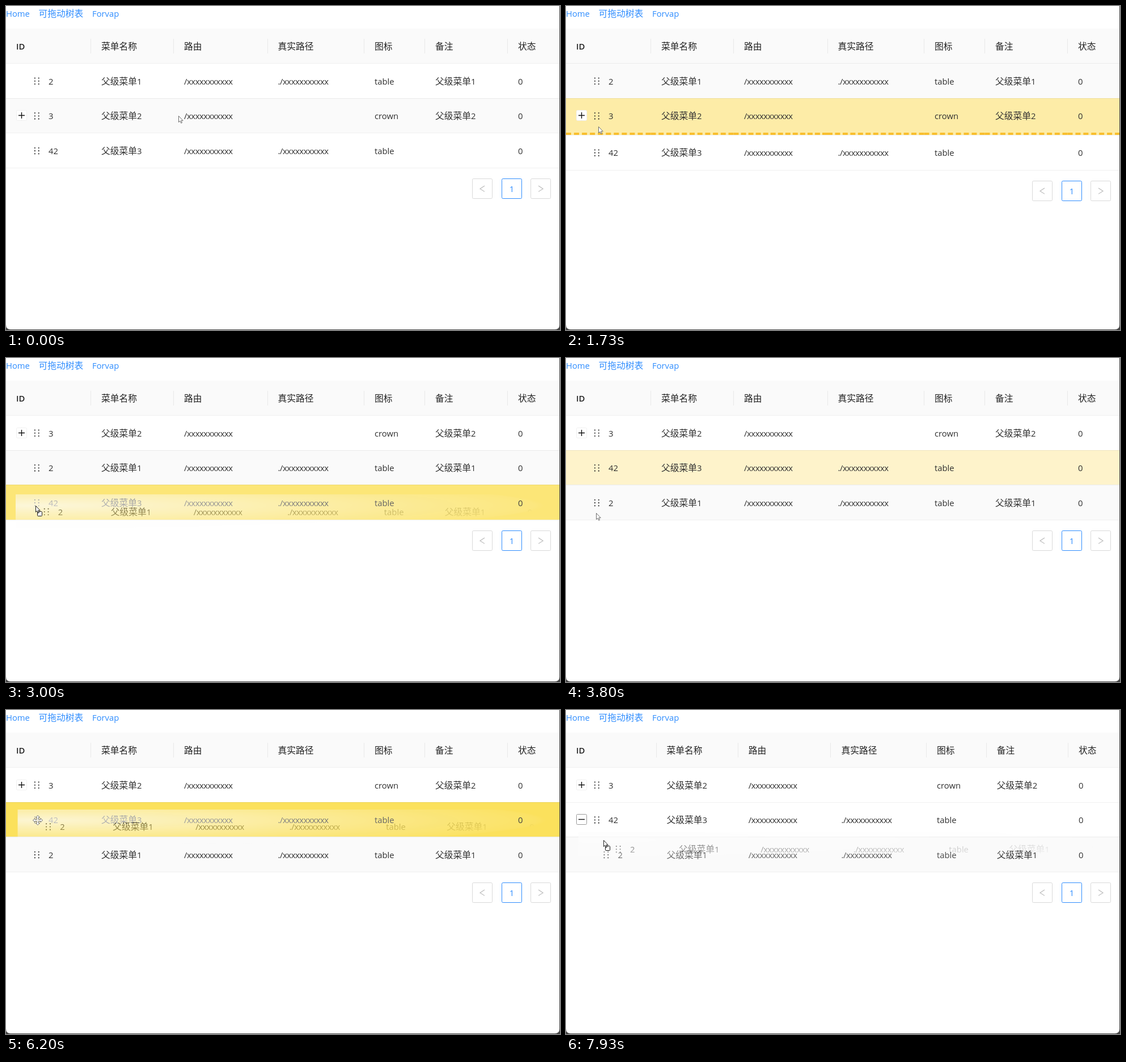
Recreate the animation shown at these times as an HTML page. Size 977x573 px, loop 8000 ms.

```html
<!DOCTYPE html>
<html lang="zh">
<head>
<meta charset="utf-8">
<title>可拖动树表</title>
<style>
  html, body { margin: 0; width: 100%; height: 100%; overflow: hidden; background: #444; }
  svg { display: block; width: 100%; height: 100%; }
  text { font: 14.8px "Open Sans", "Noto Sans", sans-serif; fill: #303030; }
  .cjk { font: 15.75px "Noto Sans CJK SC", "Noto Sans CJK", sans-serif; }
  .path { letter-spacing: -.42px; }
  .strong { font-weight: 600; fill: #222; }
  .link { fill: #2f8dfe; }
</style>
</head>
<body>
<svg id="stage" viewBox="0 0 977 573" xmlns="http://www.w3.org/2000/svg"></svg>
<script>
const LOOP = 8000, WIDTH = 977;
const TOP = 40.2, ROW = 61.7, LINE = 4.5, INDENT = 16.5;
const FADE = 240, FADE_STEPS = 12;
const LOWER_ZONE = .66; // dropping below this part of a row inserts after it
const HOT_SCALE = 1.48; // the drag image hangs at a scaled hotspot

const WHITE = [255, 255, 255], GREY = [250, 250, 250];
const AMBER = [254, 240, 192], YELLOW = [251, 225, 92];
const BLUE = '#2f8dfe';

const EDGES = [0, 149.5, 295.5, 461, 631.5, 738.5, 884.5, WIDTH];
// the widened first column takes its space evenly from the others
const EDGES_OPEN = EDGES.map(x => x && x + 9.5 * (WIDTH - x) / (WIDTH - EDGES[1]));
const HEADS = ['ID', '菜单名称', '路由', '真实路径', '图标', '备注', '状态'];

const SLASHES = '/xxxxxxxxxxx';
const ITEMS = {
  2: ['父级菜单1', SLASHES, '.' + SLASHES, 'table', '父级菜单1', '0'],
  3: ['父级菜单2', SLASHES, '', 'crown', '父级菜单2', '0'],
  42: ['父级菜单3', SLASHES, '.' + SLASHES, 'table', '', '0']
};

const START_ORDER = [2, 3, 42];
const DRAGS = [
  { from: 930, release: 1715, drop: 1795, row: 0, order: [3, 2, 42] },
  { from: 2670, release: 3750, drop: 3770, row: 1, order: [3, 42, 2] },
  { from: 5400, release: 6250, drop: 6265, row: 2, order: [3, 42] },
  { from: 7330, release: LOOP, drop: LOOP, row: 2 }
];
const NESTED = DRAGS[2].drop, EXPANDED = 6650;

// start, end, x, y of each pointer move
const MOVES = [
  [0, 0, 304, 194], [70, 730, 52, 131], [930, 1730, 57, 213], [1800, 2130, 52, 174],
  [2270, 2400, 52, 193], [2670, 2980, 52, 261], [3050, 3470, 53, 274], [3800, 4270, 53, 267],
  [4470, 4750, 61, 249], [4750, 5000, 53, 267], [5020, 5200, 53, 254], [5400, 6150, 56, 195],
  [6300, 6500, 27, 196], [6700, 7200, 66, 247], [7330, 7530, 66, 236], [7870, 7930, 66, 230]
];

const mix = (a, b, p) => a + (b - a) * p;
const ease = p => p * p * (3 - 2 * p);

function pointerAt(t) {
  const i = MOVES.findLastIndex(m => m[0] <= t);
  const [start, end, x, y] = MOVES[i];
  if (t >= end) return [x, y];
  const p = ease((t - start) / (end - start)), last = MOVES[i - 1];
  return [mix(last[2], x, p), mix(last[3], y, p)];
}

function stateAt(t) {
  const open = t >= EXPANDED;
  const done = DRAGS.filter(d => d.drop <= t).pop();
  const order = open ? [3, 42, 2] : done ? done.order : START_ORDER;
  const drag = DRAGS.find(d => t >= d.from && t < d.drop);
  const at = pointerAt(t);
  const place = (at[1] - TOP) / ROW - 1, over = Math.floor(place);
  const target = drag && over !== drag.row;
  return { open, order, drag, at, over, target, after: target && place - over > LOWER_ZONE };
}

function goalFill(id, t) {
  const { order, drag, over, target, after } = stateAt(t), i = order.indexOf(id);
  if (target && i === over) return after ? AMBER : YELLOW;
  return i === (drag ? drag.row : over) ? GREY : WHITE;
}

// averaging the recent goals gives a linear colour transition
function fillAt(id, t) {
  const sum = [0, 0, 0];
  for (let k = 0; k < FADE_STEPS; k++) {
    const goal = goalFill(id, Math.max(0, t - FADE * k / FADE_STEPS));
    goal.forEach((c, i) => sum[i] += c);
  }
  return `rgb(${sum.map(c => Math.round(c / FADE_STEPS))})`;
}

const rect = (x, y, w, h, fill, more = '') =>
  `<rect x="${x}" y="${y}" width="${w}" height="${h}" fill="${fill}" ${more}/>`;

const stroke = (d, color, width = 1, more = '') =>
  `<path d="${d}" fill="none" stroke="${color}" stroke-width="${width}" ${more}/>`;

const label = (x, y, s, cls = '', more = '') =>
  `<text x="${x}" y="${y}" class="${cls}" ${more}>` +
  s.replace(/[\u4e00-\u9fff]+/g, '<tspan class="cjk">$&</tspan>') + '</text>';

const snap = y => Math.floor(y - .5);
const border = y => rect(0, snap(y), WIDTH, 1, '#000', 'opacity=".06"');

function grip(x, y) {
  let out = '';
  for (const dx of [-3.4, 3.4])
    for (const dy of [-5.2, 0, 5.2])
      out += `<circle cx="${x + dx}" cy="${y + dy}" r="1.05" fill="#222"/>`;
  return out;
}

const expander = (y, open) =>
  rect(18.5, Math.round(y) - 8.5, 18, 18, '#fff', `rx="2" stroke="${open ? '#999' : '#f0f0f0'}"`) +
  stroke(`M22 ${Math.round(y) + .5}h11` + (open ? '' : 'm-5.5 -5.5v11'), '#111', 1.4);

function row(id, top, fill, edges, indent, button) {
  const mid = top + ROW / 2, base = mid + 5.8;
  return rect(0, snap(top), WIDTH, snap(top + ROW) - snap(top), fill) +
    (button ? expander(mid - 1, button === 'open') : '') +
    grip(54.3 + indent, mid) + label(75 + indent, base, String(id)) +
    ITEMS[id].map((s, i) => label(edges[i + 1] + 18.5, base, s, s.includes('/') ? 'path' : '')).join('');
}

function dropLine(y, edges) {
  const dash = 9, period = 13.5;
  return edges.slice(1).map((right, i) => {
    const width = right - edges[i];
    const gap = (width - dash) / Math.round((width - dash) / period) - dash;
    return stroke(`M${edges[i]} ${y + LINE / 2}h${width}`, '#f9bf2e', LINE, `stroke-dasharray="${dash} ${gap}"`);
  }).join('');
}

function header(edges) {
  const links = label(0, 18.7, 'Home', 'link') + label(57.5, 18.7, '可拖动树表', 'link') +
    label(152, 18.7, 'Forvap', 'link');
  const cells = HEADS.map((s, i) =>
    (i ? rect(Math.floor(edges[i]), 58, 1, 26, '#e9e9e9') : '') +
    label(i ? edges[i] + 18.5 : 18, 77, s, 'strong')).join('');
  return links + rect(0, 40, WIDTH, 61, '#fafafa') + cells;
}

function pager(y) {
  const box = (x, color) => rect(x + .5, y + .5, 35, 35, '#fff', `rx="2" stroke="${color}"`);
  const arrow = (x, dir) => stroke(`M${x + 4 * dir} ${y + 13}l${-8 * dir} 5.2l${8 * dir} 5.2`, '#b8b8b8', 1.1);
  return box(822, '#d9d9d9') + box(874, BLUE) + box(925, '#d9d9d9') +
    arrow(840, 1) + arrow(943, -1) + label(892, y + 24.4, '1', 'link', 'text-anchor="middle"');
}

function ghost(drag, [x, y], edges, indent) {
  const [sx, sy] = pointerAt(drag.from);
  const hx = sx / HOT_SCALE, hy = (sy - TOP - ROW * (drag.row + 1)) / HOT_SCALE;
  return `<defs><radialGradient id="glow" gradientUnits="userSpaceOnUse" cx="0" cy="0" r="1"
      gradientTransform="translate(${hx} ${hy}) scale(898 48)">
      <stop offset="0" stop-color="#fff" stop-opacity=".74"/>
      <stop offset=".98" stop-color="#fff" stop-opacity=".06"/>
      <stop offset="1" stop-color="#fff" stop-opacity="0"/></radialGradient>
    <mask id="veil" maskUnits="userSpaceOnUse" x="0" y="0" width="${WIDTH}" height="${ROW}">
      ${rect(0, 0, WIDTH, ROW, 'url(#glow)')}</mask></defs>
    <g transform="translate(${x - hx} ${y - hy})" mask="url(#veil)">
      ${row(2, 0, '#fcfcfc', edges, indent)}</g>`;
}

function pointer([x, y], dragging, overGrip) {
  const place = `transform="translate(${x} ${y})" fill="#fff"`;
  if (overGrip) {
    const heads = [0, 90, 180, 270].map(a =>
      `<path d="M-1.5 -1.5V-5H-3.5L0 -8.5L3.5 -5H1.5V-1.5" transform="rotate(${a})"/>`).join('');
    return `<g ${place} stroke="#444" stroke-width=".8">${heads}</g>`;
  }
  return `<g ${place} stroke="${dragging ? '#111' : '#666'}">
    ${dragging ? rect(3.5, 10.5, 8, 8, '#fff', 'rx="1"') : ''}
    <path d="M.5 .5V11.5L3 9.3L4.8 13.2L6.5 12.4L4.8 8.7H8.2Z" stroke-width=".95"/></g>`;
}

function scene(t) {
  const { open, order, drag, at, over, after } = stateAt(t);
  const edges = open ? EDGES_OPEN : EDGES;
  const childIndent = open ? INDENT : 0;
  const buttons = { 3: 'closed', 42: open ? 'open' : t >= NESTED && 'closed' };

  let y = TOP + ROW, out = header(edges), overGrip = false;
  order.forEach((id, i) => {
    const indent = id === 2 ? childIndent : 0, fill = fillAt(id, t);
    out += row(id, y, fill, edges, indent, buttons[id]) + border(y);
    overGrip ||= Math.abs(at[0] - 54 - indent) < 9 && Math.abs(at[1] - y - ROW / 2) < 9;
    y += ROW;
    if (after && over === i) {
      out += rect(0, snap(y), WIDTH, LINE, fill) + dropLine(snap(y), edges);
      y += LINE - 1;
    }
  });
  out += (after && over === order.length - 1 ? '' : border(y)) + pager(Math.round(y + 18));

  const dragging = drag && t < drag.release - 60;
  if (drag && t < drag.release) out += ghost(drag, at, edges, childIndent);
  out += pointer(at, dragging, overGrip && !dragging);

  return rect(0, 0, WIDTH, 573, '#444') +
    `<clipPath id="page"><path d="M0 0H976V564Q976 572 968 572H8Q0 572 0 564Z"/></clipPath>
    <g clip-path="url(#page)">${rect(0, 0, WIDTH, 573, '#fff')}${out}</g>`;
}

const stage = document.getElementById('stage');
let shown = '';
function tick() {
  const next = scene(performance.now() % LOOP);
  if (next !== shown) stage.innerHTML = shown = next;
  requestAnimationFrame(tick);
}
tick();
</script>
</body>
</html>
```
